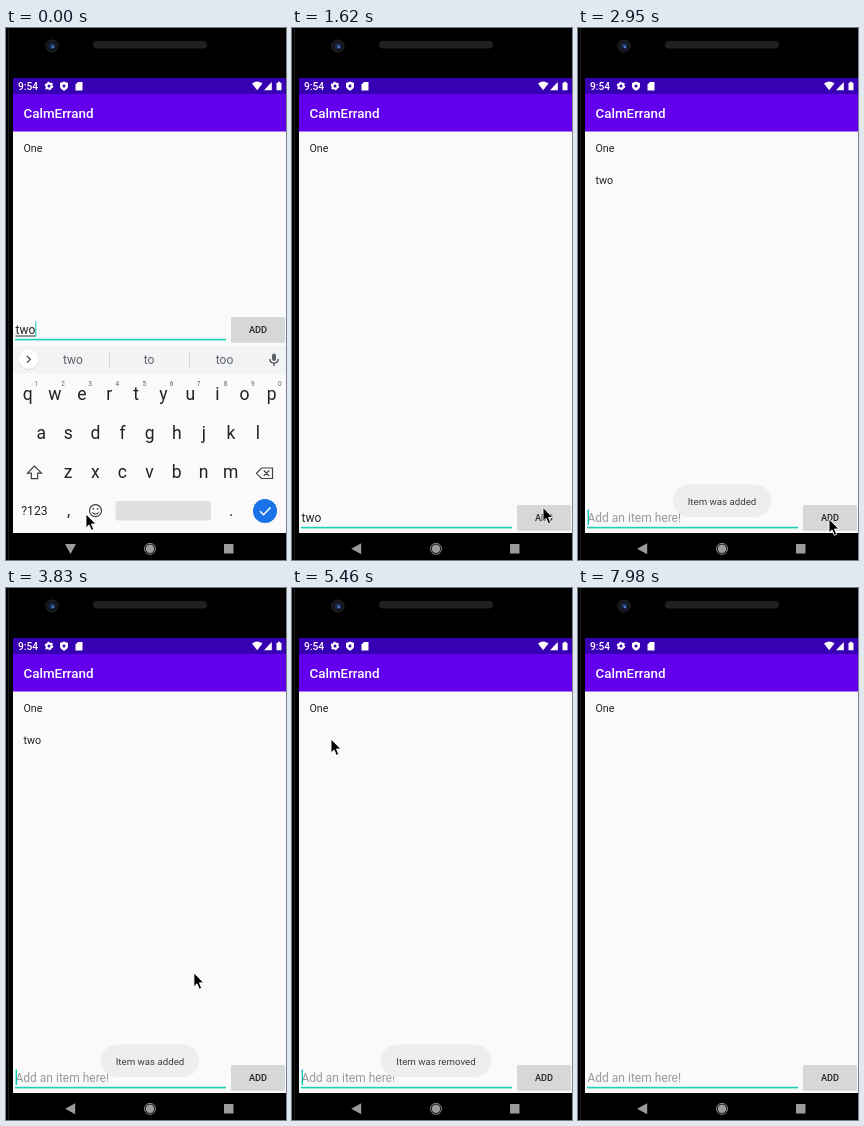
These frames come from a looping animation (280 px wide and 532 px high, 8000 ms). An HTML page:

```html
<!DOCTYPE html>
<html lang="en">
<head>
<meta charset="utf-8">
<title>Todo list</title>
<style>
html, body { margin: 0; width: 100%; height: 100%; overflow: hidden; background: #000; }
svg { display: block; width: 100%; height: 100%; }
text { font-family: Roboto, sans-serif; }
.mid { text-anchor: middle; }
.line { fill: none; stroke: #3c4043; stroke-width: 1.2; }
</style>
</head>
<body>
<svg viewBox="0 0 280 532">
  <defs>
    <radialGradient id="lens">
      <stop offset="0" stop-color="#2b4a80"/>
      <stop offset=".45" stop-color="#15203a"/>
      <stop offset=".7" stop-color="#101114"/>
      <stop offset="1" stop-color="#29292b"/>
    </radialGradient>
  </defs>

  <rect width="280" height="532"/>
  <rect x="2" width="1" height="532" fill="#1c1c1c"/>
  <circle cx="46" cy="18" r="6.5" fill="url(#lens)"/>
  <circle cx="47" cy="19" r="1.2" fill="#5a80c4"/>
  <rect x="87" y="13" width="114" height="7.5" rx="3.7" fill="#202020"/>

  <rect x="7" y="50" width="273" height="455" fill="#fafafa"/>
  <rect x="7" y="50" width="273" height="16.5" fill="#3700b3"/>
  <rect x="7" y="66" width="273" height="37.5" fill="#6200ee"/>
  <g fill="#fff">
    <text x="12" y="62" font-size="10.2" font-weight="500">9:54</text>
    <circle cx="43" cy="58" r="2.5" fill="none" stroke="#fff" stroke-width="2"/>
    <circle cx="43" cy="58" r="3.7" fill="none" stroke="#fff" stroke-width="1.2" stroke-dasharray="1.9 1.97"/>
    <path d="M58 53.5l4 1.6v3q0 3-4 4.6q-4-1.6-4-4.6v-3z"/>
    <circle cx="58" cy="58" r="1.5" fill="#3700b3"/>
    <path d="M72 54h4.5v8.5h-7v-6z"/>
    <path d="M246 55.5Q251.200 51.500 256.400 55.500L251.200 62.300z"/>
    <path d="M258 62.300h7.800v-8.300z"/>
    <path d="M270.500 54.800h1.500v-1h2v1h1.500v7.500h-5z"/>
    <text x="17.500" y="90" font-size="13.400" font-weight="500">CalmErrand</text>
  </g>

  <g font-size="10.700" fill="#212121">
    <text x="17.500" y="123.500">One</text>
    <text id="second" x="17.500" y="155.500">two</text>
  </g>

  <g id="entry">
    <text id="typed" x="9.500" y="306" font-size="12" fill="#212121">two</text>
    <text id="hint" x="9.500" y="306" font-size="12" fill="#9a9a9a">Add an item here!</text>
    <rect id="compose" x="9.500" y="307.500" width="20" height="1" fill="#333"/>
    <rect id="caret" y="293.500" height="15.500" fill="#03c9b6"/>
    <rect x="9" y="310.800" width="211" height="1.600" fill="#1fcfbd"/>
    <rect x="225" y="290" width="54" height="25" rx="1.500" fill="#000" opacity=".12"/>
    <rect x="225" y="289" width="54" height="25" rx="1.500" fill="#d6d7d7"/>
    <rect id="press" x="225" y="289" width="54" height="25" rx="1.500" opacity=".1"/>
    <text class="mid" x="252" y="304.800" font-size="9.200" font-weight="500" fill="#212121">ADD</text>
  </g>

  <g id="keyboard">
    <rect x="7" y="318" width="273" height="187" fill="#fafafa"/>
    <rect x="7" y="318" width="273" height="27.500" fill="#f1f3f4"/>
    <circle cx="22.500" cy="332" r="10" fill="#000" opacity=".12"/>
    <circle cx="22.500" cy="331.300" r="9.800" fill="#fff"/>
    <path class="line" d="M21 328l3.300 3.300l-3.300 3.300"/>
    <path d="M103.500 324v16M183.500 324v16" stroke="#d5d8da"/>
    <rect x="266" y="325.500" width="4" height="7.500" rx="2" fill="#5f6368"/>
    <path class="line" d="M263.800 331q0 4 4.200 4t4.200-4M268 335v3"/>
    <g id="keys" fill="#202124"></g>
    <path class="line" d="M28.500 438l-7 7.200h3.800v5.500h6.400v-5.500h3.800z"/>
    <path class="line" d="M255.500 440h11v10.500h-11l-5-5.200zM257.800 442.500l5.400 5.400M263.200 442.500l-5.400 5.400"/>
    <circle class="line" cx="89.500" cy="482.700" r="6"/>
    <path class="line" d="M86.300 484.300q3.200 3.600 6.400 0"/>
    <path d="M86.700 480.700h1.500M90.800 480.700h1.500" stroke="#3c4043" stroke-width="1.500"/>
    <rect x="109.500" y="473" width="95.500" height="19.500" rx="2" fill="#e0e0e0"/>
    <circle cx="259" cy="483" r="12" fill="#1a73e8"/>
    <path d="M254 483.300l3.500 3.500l7-7.300" fill="none" stroke="#fff" stroke-width="1.500"/>
  </g>

  <g id="toast">
    <rect id="pill" y="456.500" height="32.500" rx="16.200" fill="#eee"/>
    <text id="message" class="mid" x="144" y="476.600" font-size="9.700" fill="#3c3c3c"></text>
  </g>

  <rect x="7" y="505" width="273" height="27"/>
  <g fill="#9b9b9b">
    <path id="back" d="M-5.300 0L4.700-5.500V5.500z"/>
    <circle cx="144" cy="520.800" r="4.300"/>
    <circle cx="144" cy="520.800" r="5.500" fill="none" stroke="#9b9b9b" stroke-width=".9"/>
    <rect x="218" y="516" width="9.500" height="9.500"/>
  </g>

  <path id="pointer" d="M0 0V13.800L3.100 10.900L5.300 16.300L7.700 15.300L5.500 10H9.800z" stroke="#fff" stroke-width=".9"/>
</svg>
<script>
const LOOP = 8000, STEP = 147.3, START = 435;
const $ = id => document.getElementById(id);
const show = (id, on) => $(id).setAttribute('display', on ? 'inline' : 'none');
const set = (id, attrs) => {
  for (const name in attrs) $(id).setAttribute(name, attrs[name]);
};

function label(text, x, y, size, fill) {
  const el = document.createElementNS('http://www.w3.org/2000/svg', 'text');
  el.textContent = text;
  el.setAttribute('class', 'mid');
  el.setAttribute('x', x);
  el.setAttribute('y', y);
  el.setAttribute('font-size', size);
  if (fill) el.setAttribute('fill', fill);
  $('keys').append(el);
}

function row(letters, x, y) {
  [...letters].forEach((c, i) => label(c, x + i * 27.1, y, 17.5));
}

row('qwertyuiop', 21.8, 371.5);
row('asdfghjkl', 35.2, 410.5);
row('zxcvbnm', 62.2, 450);
[...'1234567890'].forEach((c, i) => label(c, 30 + i * 27.1, 358, 6.5, '#5f6368'));
label('two', 67, 336, 12, '#5f6368');
label('to', 143, 336, 12, '#5f6368');
label('too', 218.5, 336, 12, '#5f6368');
label('?123', 28.5, 487, 12.2);
label(',', 62.5, 488, 16);
label('.', 225, 488, 16);

// time, x, y
const path = [
  [0, 80, 486], [450, 80, 486], [1180, 251, 478], [1480, 251, 478],
  [2200, 251, 491], [3000, 251, 491], [3530, 188, 385], [3830, 188, 385],
  [4420, 40, 149], [5300, 40, 149], [5450, 39, 151], [5900, 39, 151],
  [6190, 221, 404], [6320, 221, 404], [6460, 251, 474], [LOOP, 251, 474]
];
const blinks = [600, 1040, 1620, 2060, 2500, 2800, 3100, 3540, 4130, 4570,
  5010, 5460, 6060, 6500, 6950, 7400, 7980];
const toasts = [
  { text: 'Item was added', x: 95, w: 98, from: 2800, to: 5010 },
  { text: 'Item was removed', x: 89, w: 110, from: 5310, to: 7550 }
];

function pointerAt(t) {
  const i = path.findIndex(p => p[0] > t);
  const [t0, x0, y0] = path[i - 1], [t1, x1, y1] = path[i];
  const p = (t - t0) / (t1 - t0), e = p * p * (3 - 2 * p);
  return [x0 + (x1 - x0) * e, y0 + (y1 - y0) * e];
}

// The caret starts lit; the blink at 2800 is a restart and keeps it lit.
function caretOn(t) {
  const count = blinks.filter(b => b <= t + 5).length;
  return (t < 2795 ? count : count - 6) % 2 === 0;
}

function draw(t) {
  const tick = Math.max(0, Math.floor((t - START) / STEP));
  const held = 450 + tick * STEP;
  const closed = t >= 1475, added = t >= 2795;

  set('entry', { transform: `translate(0 ${closed ? 188 : 0})` });
  show('typed', !added);
  show('hint', added);
  show('compose', t < 1325);
  show('caret', caretOn(t));
  set('caret', { x: added ? 9.6 : 29.3, width: added ? 1.4 : 1 });
  show('press', t >= 2645 && t < 2940);
  show('second', added && t < 5305);

  show('keyboard', t < 1615);
  set('keyboard', {
    transform: `translate(0 ${closed ? 36 : 0})`,
    opacity: closed ? 0.5 : 1
  });
  const turn = closed ? 0 : t >= 1325 ? -70 : -90;
  set('back', { transform: `translate(64.500 520.800) rotate(${turn})` });

  const toast = toasts.find(m => t >= m.from - 5 && t < m.to - 5);
  show('toast', toast);
  if (toast) {
    const fading = t < toast.from + 140 || t >= toast.to - 155;
    set('toast', { opacity: fading ? 0.5 : 1 });
    set('pill', { x: toast.x, width: toast.w });
    $('message').textContent = toast.text;
  }

  const [x, y] = pointerAt(Math.min(held, LOOP - 1));
  set('pointer', { transform: `translate(${x} ${y})` });
  show('pointer', t < 6645);
}

const begin = performance.now();
function frame() {
  draw((performance.now() - begin) % LOOP);
  requestAnimationFrame(frame);
}
draw(0);
requestAnimationFrame(frame);
</script>
</body>
</html>
```
